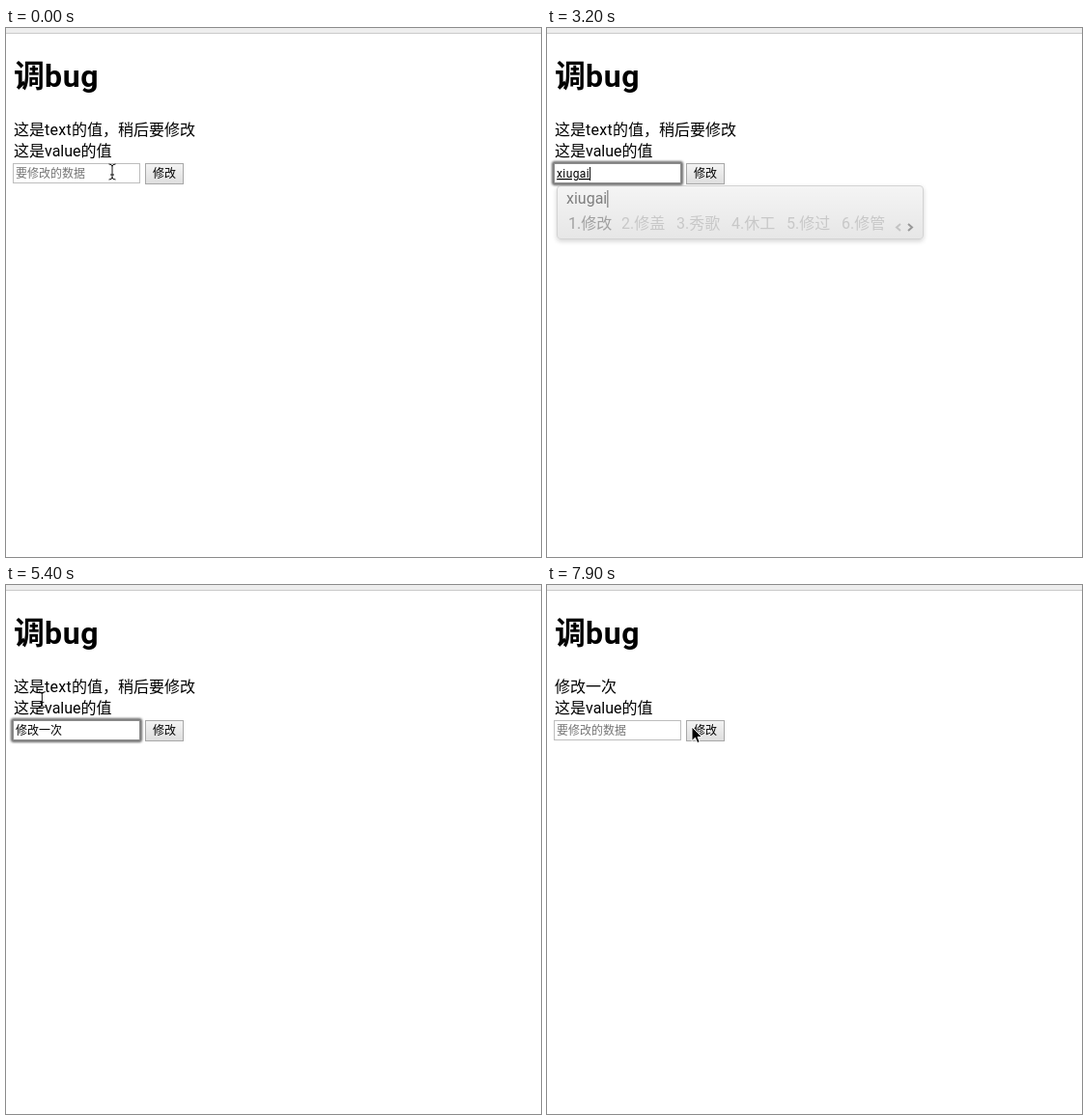
Recreate the animation shown at these times as an HTML page. Size 554x548 px, loop 8 s.

```html
<!DOCTYPE html>
<html lang="zh-CN">
<head>
<meta charset="utf-8">
<title>调bug</title>
<style>
  html, body { margin: 0; width: 100%; height: 100%; overflow: hidden; background: #fff; }
  svg { display: block; font: 16px Roboto, "Noto Sans CJK SC", "Noto Sans CJK", sans-serif; }
  text { white-space: pre; }
  .small { font-size: 12px; }
  .latin { letter-spacing: .3px; }
  .ime { text-decoration: underline; text-decoration-skip-ink: none; }
</style>
</head>
<body>
<svg width="554" height="548" viewBox="0 0 554 548">
  <defs>
    <linearGradient id="btnFill" x2="0" y2="1">
      <stop stop-color="#f4f4f4"/><stop offset="1" stop-color="#dedede"/>
    </linearGradient>
    <linearGradient id="popFill" x2="0" y2="1">
      <stop stop-color="#ebebeb"/><stop offset="1" stop-color="#cfcfcf"/>
    </linearGradient>
    <filter id="glow" x="-10%" y="-40%" width="120%" height="180%"><feGaussianBlur stdDeviation="1.2"/></filter>
    <filter id="shade" x="-5%" y="-20%" width="110%" height="150%">
      <feDropShadow dx="0" dy="2" stdDeviation="2.5" flood-opacity=".35"/>
    </filter>
  </defs>

  <rect width="554" height="5" fill="#eee"/>
  <rect y="5" width="554" height="1" fill="#cbcbcb"/>
  <text x="8" y="61" font-size="32" font-weight="700">调<tspan letter-spacing=".6">bug</tspan></text>

  <rect id="sel" x="7" y="94" height="22" fill="#a9d1fd"/>
  <text id="before" x="8" y="111">这是<tspan class="latin">text</tspan>的值，稍后要修改</text>
  <text id="after" x="8" y="111">修改一次</text>
  <text x="8" y="133">这是<tspan>value</tspan>的值</text>

  <rect id="ring" x="6.5" y="139.5" width="133" height="22" rx="1.5" fill="none" stroke="#666" stroke-width="3" filter="url(#glow)"/>
  <rect id="box" x="7.5" y="140.5" width="131" height="20" fill="#fff"/>
  <text id="hint" class="small" x="10" y="155" fill="#757575">要修改的数据</text>
  <text id="field" class="small" x="10" y="155"><tspan id="done"></tspan><tspan id="raw" letter-spacing=".4"></tspan></text>
  <rect id="caret" y="144" width="1" height="14"/>

  <rect id="btn" x="144.5" y="140.5" width="39" height="21" stroke="#a8a8a8"/>
  <text class="small" x="152" y="155">修改</text>

  <g id="popup">
    <rect id="panel" x=".5" y="163.5" height="55" rx="3.5" fill="url(#popFill)" stroke="#a9a9a9" filter="url(#shade)"/>
    <text id="spell" x="10" y="182"></text>
    <rect id="spellCaret" y="168" width="1.2" height="18"/>
    <g id="cands"></g>
    <g id="arrows" fill="none" stroke-width="2">
      <path d="M3 203l-4 3.500 4 3.500" stroke="#8a8a8a"/>
      <path d="M11 203l4 3.500-4 3.500" stroke="#333"/>
    </g>
  </g>

  <g id="pointer">
    <path id="beam" d="M-3.500-8Q0-8 0-5.500Q0-8 3.500-8M0-5.500V5.500M-3.500 8Q0 8 0 5.500Q0 8 3.500 8M-2 3H2" fill="none" stroke="#111"/>
    <path id="arrow" d="M0 0V14.500L3.400 11.300L5.700 16.600L8.200 15.500L6 10.400H10.500Z" stroke="#fff"/>
    <circle id="press" cy="-1" r="14.800" fill="#fff" fill-opacity=".2" stroke="#111" stroke-width="3"/>
  </g>
</svg>
<script>
const LOOP = 8000, TICK = 100;
const $ = id => document.getElementById(id);
const show = (id, on) => $(id).setAttribute('visibility', on ? 'visible' : 'hidden');
const set = (id, attrs) => { for (const k in attrs) $(id).setAttribute(k, attrs[k]); };

// time, committed text, text being typed, input method on
const typing = [
  [0, '', '', 0], [300, '', '', 0],
  [900, '', 'x', 0], [1000, '', 'xi', 0], [1200, '', 'xiu', 0], [1300, '', 'xiug', 0],
  [1500, '', 'xiu', 0], [1700, '', 'xi', 0], [1900, '', 'x', 0], [2100, '', '', 0],
  [2500, '', 'x', 1], [2600, '', 'xi', 1], [2700, '', 'xiu', 1], [2800, '', 'xiug', 1],
  [2900, '', 'xiuga', 1], [3000, '', 'xiugai', 1], [3300, '修改', '', 0],
  [3400, '修改', 'y', 1], [3500, '修改', 'yi', 1], [3900, '修改', "yi'c", 1],
  [4000, '修改', "yi'ci", 1], [4500, '修改一次', '', 0], [7600, '', '', 0]
];

const words = {
  x: '想 下 小 性 向 新',
  xi: '系 西 洗 喜 习 细',
  xiu: '修 秀 休 ~(@^_^@)~ 绣 羞',
  xiug: '修改 修盖 秀歌 休工 修过 修管',
  y: '有 要 也 以 与 用',
  yi: '一 已 以 咦 ① 姨',
  "yi'c": '一次 一层 一处 一场 一车 一成',
  "yi'ci": '一次 依次 以此 一词 疑词 译词'
};
words.xiuga = words.xiugai = words.xiug;

// time, x, y, shape (0 hidden, 1 beam, 2 arrow), pressed
const moves = [
  [0, 110, 149, 1, 0], [300, 110, 149, 1, 1], [500, 110, 149, 1, 0], [900, 110, 149, 0, 0],
  [4900, 110, 149, 1, 0], [5300, 48, 124, 1, 0], [5600, 16, 108, 1, 1], [5700, 16, 108, 1, 1],
  [6100, 171, 108, 1, 1], [6300, 204, 108, 1, 1], [6400, 204, 108, 1, 0], [6600, 224, 110, 2, 0],
  [6700, 224, 110, 2, 1], [6900, 224, 110, 2, 0], [7300, 152, 152, 2, 0], [7400, 152, 152, 2, 1],
  [7600, 152, 152, 2, 0], [7800, 150, 147, 2, 0], [LOOP, 150, 147, 2, 0]
];

// character edges of the selectable line
const edges = [8, 24, 40, 46, 54, 62, 68];
for (let x = 84; x <= 196; x += 16) edges.push(x);

const between = (t, a, b) => t >= a && t < b;
const stepAt = (list, t) => list.findLastIndex(s => s[0] <= t);

function drawPointer(t) {
  const i = stepAt(moves, t), a = moves[i], b = moves[i + 1] || a;
  const p = (t - a[0]) / (b[0] - a[0] || 1);
  const x = a[1] + (b[1] - a[1]) * p, y = a[2] + (b[2] - a[2]) * p;
  set('pointer', { transform: `translate(${x} ${y})` });
  show('beam', a[3] === 1);
  show('arrow', a[3] === 2);
  show('press', a[4]);
  return x;
}

function drawSelection(t, x) {
  show('sel', between(t, 5600, 6700));
  const reach = t < 6300 ? x : 204;
  const end = edges.findLast((e, i) => !i || (e + edges[i - 1]) / 2 < reach);
  set('sel', { width: end - 7 });
}

let listed = '';
function drawPopup(left, raw, opacity) {
  set('popup', { transform: `translate(${left} 0)`, opacity });
  if (listed === raw) return;
  listed = raw;
  $('spell').textContent = raw;
  set('spellCaret', { x: 10 + $('spell').getComputedTextLength() });
  $('cands').replaceChildren();
  let x = 12;
  words[raw].split(' ').forEach((word, i) => {
    const item = document.createElementNS('http://www.w3.org/2000/svg', 'text');
    item.textContent = `${i + 1}.${word}`;
    item.setAttribute('x', x);
    item.setAttribute('y', 208);
    item.setAttribute('fill', i ? '#929292' : '#444');
    $('cands').append(item);
    x += (word[0] === '~' ? 79 : word.length * 16) + (i ? 25 : 23);
  });
  set('arrows', { transform: `translate(${x + 1} 0)` });
  set('panel', { width: x + 27 });
}

function drawField(t) {
  const [start, done, raw, ime] = typing[stepAt(typing, t)];
  const focus = between(t, 300, 5600);
  $('done').textContent = done;
  $('raw').textContent = raw;
  $('raw').setAttribute('class', ime ? 'ime' : '');
  show('hint', !done && !raw);
  show('ring', focus);
  set('box', { stroke: focus ? '#8c8c8c' : '#bdbdbd' });
  show('caret', focus && (t - start) % 1000 < 500);
  set('caret', { x: 10 + (done || raw ? $('field').getComputedTextLength() : 0) });

  const fade = t < 3300 ? (3300 - t) / 200 : (4400 - t) / 200;
  const open = ime && fade > 0;
  show('popup', open);
  if (open) drawPopup(10 + done.length * 12, raw, Math.min(1, fade));
}

function draw(t) {
  drawSelection(t, drawPointer(t));
  drawField(t);
  show('before', t < 7600);
  show('after', t >= 7600);
  set('btn', { fill: between(t, 7400, 7600) ? '#d0d0d0' : 'url(#btnFill)' });
}

const begin = performance.now();
function frame() {
  const t = (performance.now() - begin) % LOOP;
  draw(Math.floor(t / TICK) * TICK);
  requestAnimationFrame(frame);
}
frame();
</script>
</body>
</html>
```
